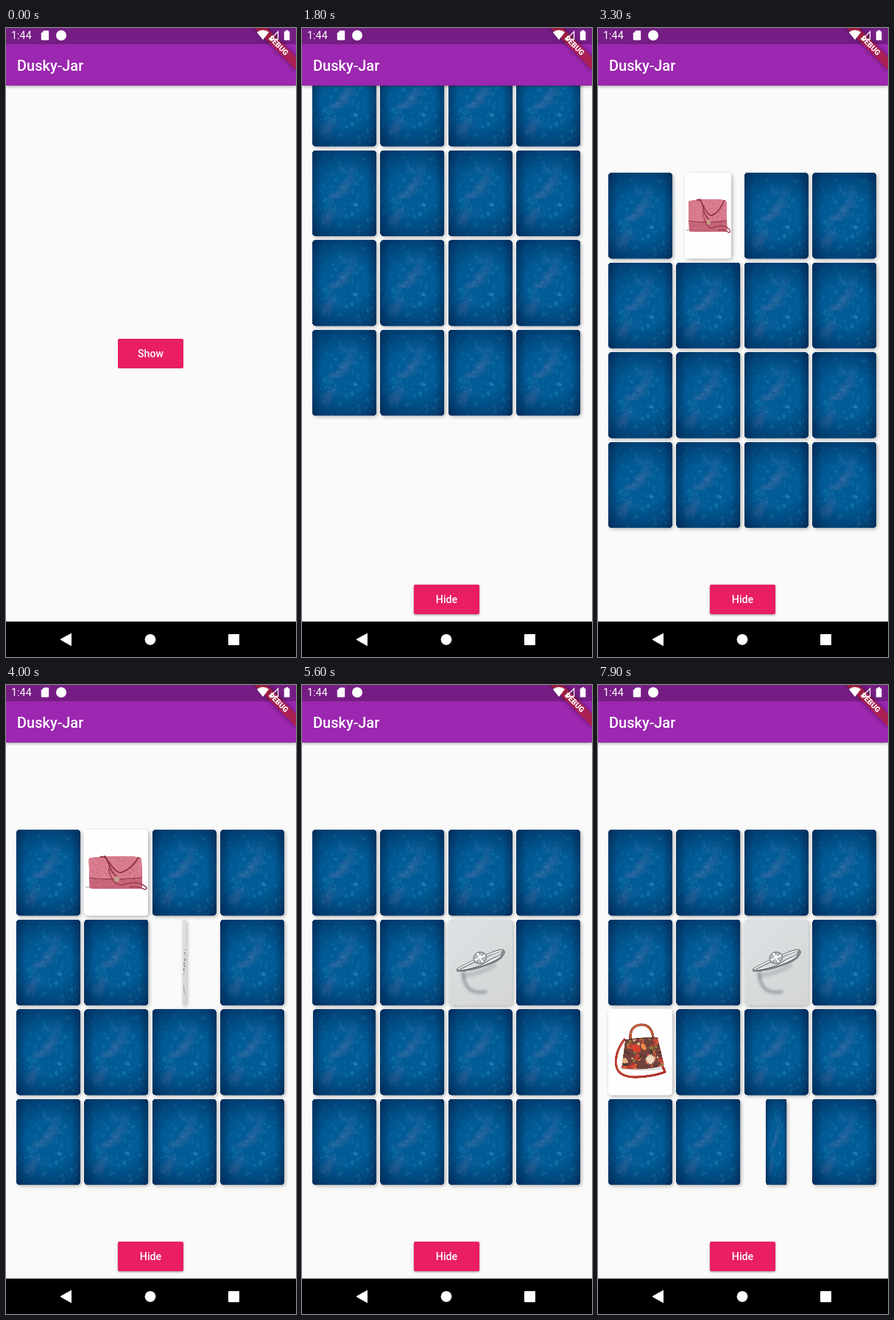
Write an HTML page with a canvas that moves like this. It is 394 px wide and 852 px high and loops after 8000 ms.

```html
<!DOCTYPE html>
<html lang="en">
<head>
<meta charset="utf-8">
<title>Card reveal</title>
<style>
  html, body { margin: 0; width: 100%; height: 100%; overflow: hidden; background: #fafafa; }
  body { position: relative; font-family: Roboto, "Noto Sans", sans-serif; color: #fff; }
  body > * { position: absolute; }
  #table, #icons { left: 0; top: 0; width: 394px; height: 852px; }
  .bar { left: 0; top: 0; width: 394px; height: 78px; background: #9c27b0; overflow: hidden;
         box-shadow: 0 1px 4px rgba(0,0,0,.4); }
  .bar > * { position: absolute; white-space: nowrap; }
  .status { left: 0; top: 0; width: 394px; height: 22px; background: #751d84; }
  .clock { left: 7px; top: 2px; font-size: 14.4px; line-height: 17px; }
  .title { left: 15px; top: 39px; font-size: 20px; font-weight: 500; line-height: 24px; }
  .ribbon { left: 330px; top: 18px; width: 80px; height: 12px; transform: rotate(45deg);
            background: rgba(183,28,28,.63); box-shadow: 0 0 6px rgba(0,0,0,.45);
            font-size: 10.2px; font-weight: 900; line-height: 12px; text-align: center; }
  .button { left: 152px; width: 89px; height: 40px; border-radius: 2px; background: #e91e63;
            font-size: 14.2px; font-weight: 500; line-height: 40px; text-align: center;
            box-shadow: 0 1px 3px rgba(0,0,0,.42); }
  #show { top: 421px; box-shadow: 0 0 1px rgba(0,0,0,.3); }
  #hide { top: 754px; }
  .nav { left: 0; top: 804px; width: 394px; height: 48px; background: #000; }
</style>
</head>
<body>
<canvas id="table"></canvas>
<div class="button" id="show">Show</div>
<div class="button" id="hide">Hide</div>
<div class="bar">
  <div class="status"></div>
  <div class="clock">1:44</div>
  <div class="title">Dusky-Jar</div>
  <div class="ribbon">DEBUG</div>
</div>
<div class="nav"></div>
<svg id="icons" viewBox="0 0 394 852" fill="#fff">
  <path d="M51.5 3.5H57a1.2 1.2 0 0 1 1.2 1.2V15.3A1.2 1.2 0 0 1 57 16.5H49a1.2 1.2 0 0 1-1.2-1.2V7.2Z"/>
  <circle cx="75" cy="10" r="7"/>
  <path d="M349 16 340.8 5.8Q349-.2 357.2 5.8Z"/>
  <path d="M369.6 4.8V15.4H359.4Z" fill="none" stroke="#fff" stroke-width="1.3"/>
  <path d="M380 3h3.4v1.4h2v12h-7.6v-12H380Z"/>
  <path d="M74 828.3 88.5 820.3V836.5Z" stroke="#fff" stroke-linejoin="round"/>
  <circle cx="196" cy="828.3" r="7.4"/>
  <rect x="302" y="821" width="15" height="15" rx="1"/>
</svg>
<script>
const LOOP = 8000, TICK = 100;
const W = 87, H = 116.5, LEFT = 14, TOP = 196, DX = 92.4, DY = 121.6;
const dpr = window.devicePixelRatio || 1;
const table = document.getElementById('table');
const showBtn = document.getElementById('show');
const hideBtn = document.getElementById('hide');
table.width = 394 * dpr;
table.height = 852 * dpr;
const ctx = table.getContext('2d');

// Keyframes: [time, value]
const SLIDE = [[1000, -688], [1900, -85], [2000, 0]];
const SHOW = [[900, 1], [1400, .02], [1500, 0]];
const HIDE = [[900, 0], [1300, 1]];
const TURN = [[-50, 0], [0, .06], [100, .2], [200, .396], [500, .757], [700, 1]];

let seed = 7;
function rnd() {
  seed = (seed * 16807) % 2147483647;
  return seed / 2147483647;
}

function at(keys, t) {
  if (t <= keys[0][0]) return keys[0][1];
  for (let i = 1; i < keys.length; i++) {
    const [t0, a] = keys[i - 1], [t1, b] = keys[i];
    if (t < t1) return a + (b - a) * (t - t0) / (t1 - t0);
  }
  return keys[keys.length - 1][1];
}

function tile(paint) {
  const c = document.createElement('canvas'), k = 3;
  c.width = W * k;
  c.height = Math.round(H * k);
  const g = c.getContext('2d');
  g.scale(k, k);
  g.beginPath();
  g.roundRect(0, 0, W, H, 4.5);
  g.clip();
  g.lineCap = g.lineJoin = 'round';
  paint(g);
  return c;
}

function fill(g, color, path) {
  g.fillStyle = color;
  g.fill(new Path2D(path));
}

function line(g, color, width, path) {
  g.strokeStyle = color;
  g.lineWidth = width;
  g.stroke(new Path2D(path));
}

function dot(g, color, x, y, rx, ry = rx, turn = 0) {
  g.fillStyle = color;
  g.beginPath();
  g.ellipse(x, y, rx, ry, turn, 0, 7);
  g.fill();
}

function glow(g, x, y, r0, r1, inner, outer) {
  const s = g.createRadialGradient(x, y, r0, x, y, r1);
  s.addColorStop(0, inner);
  s.addColorStop(1, outer);
  g.fillStyle = s;
  g.fillRect(0, 0, W, H);
}

function paintBack(g) {
  g.fillStyle = '#005b96';
  g.fillRect(0, 0, W, H);
  // small scattered hearts
  for (let i = 0; i < 150; i++) {
    g.save();
    g.translate(rnd() * W, rnd() * H);
    g.rotate(rnd() * 6.3);
    const k = .7 + rnd() * .6;
    g.scale(k, k);
    fill(g, `rgba(50,150,190,${.08 + rnd() * .2})`, 'M0 2.4C-4 -.5-2-3 0-1C2-3 4-.5 0 2.4Z');
    g.restore();
  }
  // pale haze running along the diagonal
  for (let i = 0; i < 42; i++) {
    const u = rnd();
    dot(g, 'rgba(95,115,170,.09)', 22 + u * 30 + (rnd() - .5) * 16, 92 - u * 66 + (rnd() - .5) * 18, 3 + rnd() * 5);
  }
  glow(g, 45, 58, 30, 80, 'rgba(3,35,80,0)', 'rgba(3,30,72,.75)');
  const edge = g.createLinearGradient(0, 0, W, 0);
  edge.addColorStop(0, 'rgba(2,35,75,.4)');
  edge.addColorStop(.14, 'rgba(2,35,75,0)');
  edge.addColorStop(.86, 'rgba(2,35,75,0)');
  edge.addColorStop(1, 'rgba(2,35,75,.45)');
  g.fillStyle = edge;
  g.fillRect(0, 0, W, H);
}

function paintPinkBag(g) {
  g.fillStyle = '#fefefe';
  g.fillRect(0, 0, W, H);
  dot(g, 'rgba(80,95,105,.35)', 38, 78, 37, 2.5);
  fill(g, '#c76579', 'M8 38Q42 34 75 37Q78 38 78 42L79 77Q79 80 75 80H11Q7 80 7 76L6 42Q6 38 8 38Z');
  fill(g, '#d87b8d', 'M8 38Q42 34 75 37Q78 38 78 42L78 64Q43 68 7 65L6 42Q6 38 8 38Z');
  for (let i = 0; i < 130; i++) {
    dot(g, i % 2 ? 'rgba(240,175,185,.4)' : 'rgba(165,55,85,.35)', 9 + rnd() * 67, 39 + rnd() * 39, .8);
  }
  line(g, '#9c4057', 1.2, 'M7 65.5Q43 69 78 65');
  line(g, '#92374a', 2, 'M22 37Q30 34 34 49Q38 60 45 64M28 36Q43 60 50 58Q65 53 73 38');
  line(g, '#a14354', 1.6, 'M33 52Q37 75 51 75Q70 69 80 75Q88 80 82 81Q71 76 62 78');
  dot(g, '#c4a08a', 44, 67, 3.6);
}

function paintRing(g) {
  const bg = g.createLinearGradient(0, 0, W, H);
  bg.addColorStop(0, '#dde2e4');
  bg.addColorStop(.5, '#d8dcdd');
  bg.addColorStop(1, '#d4d5d6');
  g.fillStyle = bg;
  g.fillRect(0, 0, W, H);
  g.save();
  g.filter = 'blur(5px)';
  line(g, 'rgba(105,110,115,.45)', 5, 'M20 72Q22 103 50 98');
  line(g, 'rgba(130,135,138,.3)', 7, 'M22 76Q42 74 62 62');
  g.restore();
  line(g, '#777b7d', 4, 'M13 69Q33 68 48 62Q72 55 74 46');
  line(g, '#eef0f0', 1.7, 'M15 68Q33 66 50 60Q71 52 73 46');
  line(g, '#85898b', 4.2, 'M13 68Q28 59 44 53Q66 42 73 42Q77 44 73 48');
  line(g, '#e9eded', 1.8, 'M14 67Q28 59 45 52Q65 43 72 42.5');
  line(g, '#555b5e', .8, 'M18 69Q43 65 57 54L71 48');
  dot(g, '#858c93', 43, 52, 9.5, 8.5, -.3);
  for (let i = 0; i < 8; i++) {
    const a = i * Math.PI / 4;
    fill(g, i % 2 ? '#f9fbfc' : '#b9c2ca',
      `M43 52L${43 + 8.5 * Math.cos(a)} ${52 + 7.5 * Math.sin(a)}L${43 + 8 * Math.cos(a + .6)} ${52 + 7 * Math.sin(a + .6)}Z`);
  }
  dot(g, '#eef3f6', 43, 51, 2.8);
}

function paintFloralBag(g) {
  g.fillStyle = '#fefefe';
  g.fillRect(0, 0, W, H);
  dot(g, 'rgba(90,75,65,.2)', 47, 80, 32, 3);
  line(g, '#b3352e', 3.2, 'M22 41Q8 59 11 77Q14 92 38 92Q62 91 77 85L74 78');
  line(g, '#dc7a59', .8, 'M21 43Q10 59 12 77Q15 91 38 91');
  line(g, '#9b5038', 3.5, 'M30 40Q29 22 45 21Q59 21 61 39');
  line(g, '#d6643d', 1.5, 'M30 37Q32 21 45 21Q56 22 60 34');
  const body = 'M23 42Q44 38 67 39L76 76Q48 84 18 80Z';
  fill(g, '#70423b', body);
  g.save();
  g.clip(new Path2D(body));
  const hues = ['#b93831', '#da6037', '#e5b185', '#4d3733', '#8d743d', '#c7483b'];
  for (let i = 0; i < 75; i++) {
    dot(g, hues[i % hues.length], 18 + rnd() * 59, 39 + rnd() * 42, 1.2 + rnd() * 3.5, 1 + rnd() * 2, rnd() * 3);
  }
  for (let i = 0; i < 7; i++) dot(g, '#f0d7bd', 57, 68, 7, 1.4, i * .9);
  dot(g, '#d6422e', 38, 53, 7, 5, .6);
  dot(g, '#ed8b47', 48, 51, 5, 3, 1);
  g.restore();
  line(g, '#5f332d', 1.3, 'M23 42Q44 38 67 39');
}

const back = tile(paintBack);
const pinkBag = tile(paintPinkBag);
const ring = tile(paintRing);
const floralBag = tile(paintFloralBag);

// Each turn: cell index, start time, face before, face after
const turns = [
  [1, 2800, back, pinkBag],
  [6, 3700, back, ring],
  [1, 4700, pinkBag, back],
  [8, 5600, back, floralBag],
  [14, 7700, back, pinkBag]
];

function drawCard(cell, offset, t) {
  let face = back, wide = 1;
  for (const [c, start, before, after] of turns) {
    if (c !== cell || t < start) continue;
    const p = at(TURN, t - start);
    face = p < .5 ? before : after;
    wide = Math.abs(Math.cos(p * Math.PI));
  }
  const w = W * wide;
  const x = LEFT + (cell % 4) * DX + (W - w) / 2;
  const y = TOP + Math.floor(cell / 4) * DY + offset;
  ctx.save();
  ctx.shadowColor = 'rgba(0,0,0,.32)';
  ctx.shadowBlur = 5 * dpr;
  ctx.shadowOffsetX = ctx.shadowOffsetY = 1.6 * dpr;
  ctx.fillStyle = face === back ? '#043c6c' : '#fefefe';
  ctx.beginPath();
  ctx.roundRect(x + .3 * wide, y + .3, w - .6 * wide, H - .6, Math.min(4.5, w / 2));
  ctx.fill();
  ctx.restore();
  ctx.drawImage(face, x, y, w, H);
}

function render(time) {
  const t = Math.floor(time % LOOP / TICK) * TICK;
  ctx.setTransform(dpr, 0, 0, dpr, 0, 0);
  ctx.clearRect(0, 0, 394, 852);
  if (t >= 1000) {
    const offset = at(SLIDE, t);
    for (let i = 0; i < 16; i++) drawCard(i, offset, t);
  }
  showBtn.style.opacity = t < 1000 ? 1 : at(SHOW, t);
  hideBtn.style.opacity = t < 1000 ? 0 : at(HIDE, t);
}

const begin = performance.now();
function loop() {
  render(performance.now() - begin);
  requestAnimationFrame(loop);
}
loop();
</script>
</body>
</html>
```
